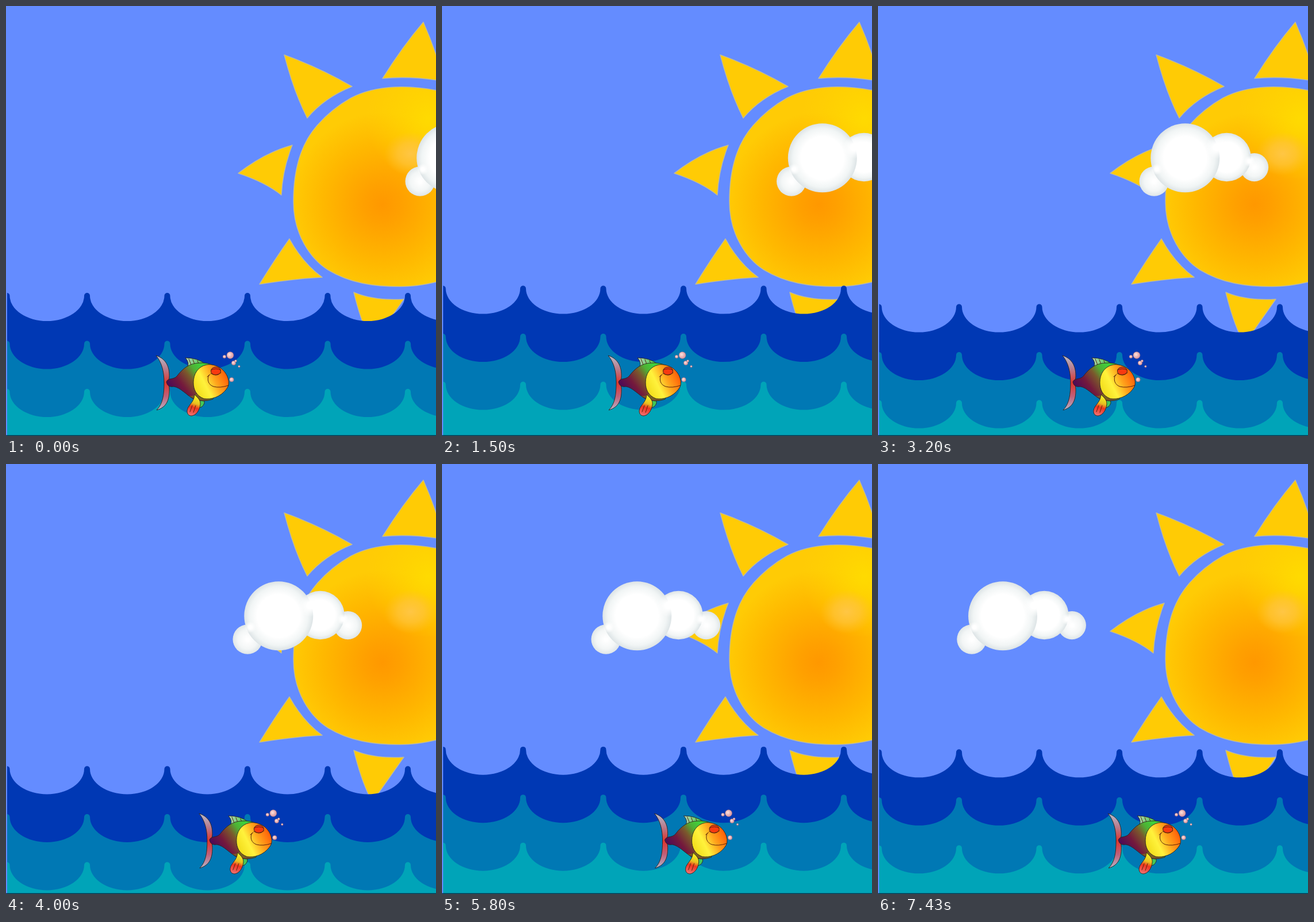
An HTML page for the animation above (7570 ms loop, 748 by 748 pixels).

```html
<!DOCTYPE html>
<html lang="en">
<head>
<meta charset="utf-8">
<title>Sun, sea and fish</title>
<style>
  html, body { margin: 0; width: 100%; height: 100%; overflow: hidden; background: #648cff; }
  svg { display: block; width: 100vw; height: 100vh; }
  .ink { stroke: #2c2420; stroke-width: .9; stroke-linejoin: round; }
  .line { fill: none; stroke: #5a2408; stroke-width: 1; stroke-linecap: round; }
</style>
</head>
<body>
<svg viewBox="0 0 748 748" preserveAspectRatio="none">
  <defs>
    <radialGradient id="sunGlow" gradientUnits="userSpaceOnUse" cx="655" cy="345" r="160">
      <stop offset="0" stop-color="#ff9800"/>
      <stop offset=".2" stop-color="#ffa000"/>
      <stop offset=".65" stop-color="#ffb800"/>
      <stop offset="1" stop-color="#ffcb05"/>
    </radialGradient>
    <radialGradient id="sunTop" gradientUnits="userSpaceOnUse" cx="735" cy="195" r="110">
      <stop offset="0" stop-color="#ffdc00" stop-opacity=".9"/>
      <stop offset="1" stop-color="#ffd400" stop-opacity="0"/>
    </radialGradient>
    <radialGradient id="shine">
      <stop offset="0" stop-color="#ffc648" stop-opacity=".95"/>
      <stop offset=".5" stop-color="#ffc440" stop-opacity=".65"/>
      <stop offset="1" stop-color="#ffc030" stop-opacity="0"/>
    </radialGradient>
    <radialGradient id="puff">
      <stop offset=".62" stop-color="#fff"/>
      <stop offset=".85" stop-color="#f1f5f5"/>
      <stop offset="1" stop-color="#dde4e6"/>
    </radialGradient>
    <radialGradient id="smallPuff">
      <stop offset=".1" stop-color="#fff"/>
      <stop offset=".65" stop-color="#f3f6f6"/>
      <stop offset="1" stop-color="#dfe6e8"/>
    </radialGradient>
    <radialGradient id="soft">
      <stop offset=".3" stop-color="#fff"/>
      <stop offset="1" stop-color="#fff" stop-opacity="0"/>
    </radialGradient>
    <linearGradient id="tail" x1="0" y1="0" x2="0" y2="1">
      <stop offset="0" stop-color="#b9bccb"/>
      <stop offset=".25" stop-color="#b87a8c"/>
      <stop offset=".5" stop-color="#e0352c"/>
      <stop offset=".75" stop-color="#c0607a"/>
      <stop offset="1" stop-color="#b4b4c8"/>
    </linearGradient>
    <linearGradient id="body" gradientUnits="userSpaceOnUse" x1="284" y1="662" x2="338" y2="622">
      <stop offset="0" stop-color="#4c0a58"/>
      <stop offset=".3" stop-color="#74193c"/>
      <stop offset=".58" stop-color="#7a5a2c"/>
      <stop offset=".78" stop-color="#4fb034"/>
      <stop offset="1" stop-color="#3fd23c"/>
    </linearGradient>
    <linearGradient id="head" gradientUnits="userSpaceOnUse" x1="332" y1="668" x2="384" y2="642">
      <stop offset="0" stop-color="#f4e020"/>
      <stop offset=".3" stop-color="#fff23c"/>
      <stop offset=".62" stop-color="#ffa41c"/>
      <stop offset="1" stop-color="#ff5e08"/>
    </linearGradient>
    <linearGradient id="belly" x1=".6" y1="0" x2=".4" y2="1">
      <stop offset=".1" stop-color="#f4ee20"/>
      <stop offset=".4" stop-color="#e8c020"/>
      <stop offset=".6" stop-color="#ee3420"/>
      <stop offset="1" stop-color="#f07070"/>
    </linearGradient>
    <linearGradient id="dorsal">
      <stop offset="0" stop-color="#b4d4b8"/>
      <stop offset="1" stop-color="#3fc840"/>
    </linearGradient>
    <radialGradient id="bubble" cx=".4" cy=".4">
      <stop offset="0" stop-color="#ffe4de"/>
      <stop offset="1" stop-color="#e0a0a8"/>
    </radialGradient>
    <clipPath id="seaBox"><rect x="2" y="0" width="746" height="748"/></clipPath>
  </defs>

  <rect width="748" height="748" fill="#648cff"/>

  <g stroke="#c6bf9a" stroke-opacity=".75" stroke-width="1.6" stroke-linejoin="round">
    <g fill="#ffcb05">
      <path d="M726 28Q690 70 655 126Q705 121 762 131Q748 78 726 28Z"/>
      <path d="M484 85Q545 107 602 140Q553 160 524 195Q501 150 484 85Z"/>
      <path d="M404 291Q450 255 498 242Q481 285 479 329Q452 307 404 291Z"/>
      <path d="M493 405Q516 447 550 472Q505 474 441 484Q466 443 493 405Z"/>
      <path d="M605 498Q640 513 692 510Q664 550 637 588Q618 552 605 498Z"/>
    </g>
    <path id="disc" fill="url(#sunGlow)" d="M760 149C705 137 645 136 600 160C575 174 554 193 541 208C512 241 500 285 500 340C500 398 530 440 560 459C598 482 640 488 685 488C712 488 735 484 760 477Z"/>
  </g>
  <path fill="url(#sunTop)" d="M748 148C705 138 645 138 601 161L601 300H748Z"/>
  <ellipse cx="704" cy="257" rx="46" ry="38" fill="url(#shine)"/>

  <g id="cloud">
    <circle cx="720.3" cy="305" r="25.8" fill="url(#smallPuff)"/>
    <circle cx="894.6" cy="280.6" r="24.6" fill="url(#smallPuff)"/>
    <circle cx="846.5" cy="263" r="42.2" fill="url(#puff)"/>
    <circle cx="774.3" cy="264.3" r="60" fill="url(#puff)"/>
    <circle cx="829" cy="246" r="20" fill="url(#soft)"/>
    <circle cx="886" cy="270" r="10" fill="url(#soft)"/>
    <circle cx="725" cy="284" r="10" fill="url(#soft)"/>
  </g>

  <g clip-path="url(#seaBox)"><g id="sea"></g></g>
  <rect y="746.6" width="748" height="1.4" fill="#0c3048"/>

  <g id="fish">
    <path class="ink" fill="url(#tail)" d="M261 608C277 613 285 626 284 646Q281 655 284 664C285 684 280 698 262 703C273 692 275 676 275 655C275 636 271 620 261 608Z"/>
    <path class="ink" fill="url(#dorsal)" d="M312 612Q332 612 346 622L316 627Q319 620 312 612Z"/>
    <path class="line" d="M318 614l4 10M325 615l3 8M333 617l2 5" stroke-width=".6"/>
    <path class="ink" fill="#43c858" d="M337 685Q346 684 345 691Q342 699 334 699Z"/>
    <path class="ink" fill="url(#body)" d="M279 654C282 646 292 651 298 643C308 630 320 621 336 621Q350 620 360 625V684Q342 690 327 684C314 677 304 664 292 662Q281 664 279 654Z"/>
    <path fill="#7c6c1c" opacity=".75" d="M318 678Q327 680 334 672L346 684Q334 688 318 678Z"/>
    <path class="ink" fill="url(#head)" d="M349 624C366 622 381 632 386 647Q390 659 383 667C373 680 357 685 344 683C331 678 326 667 326 655C326 640 334 627 349 624Z"/>
    <path class="line" d="M353 642C349 650 352 659 361 662Q372 665 387 660M350 645l5 -4"/>
    <ellipse class="ink" cx="365" cy="635" rx="8.6" ry="7" fill="#f83a10"/>
    <path class="line" d="M357 633Q365 629 373 633M356 639Q365 645 374 638"/>
    <path class="ink" fill="url(#belly)" d="M328 676C332 680 339 685 338 693C337 703 331 712 323 713C315 713 313 705 317 698C322 690 327 687 328 676Z"/>
    <path class="line" d="M324 695l-4 11M330 695l-4 12" stroke-width=".6"/>
    <g id="bubbles" fill="url(#bubble)" stroke="#9a6878" stroke-width=".5"></g>
  </g>
</svg>
<script>
const LOOP = 7570, LAST = 7430;
const $ = id => document.getElementById(id);
const SVG = 'http://www.w3.org/2000/svg';

function add(parent, tag, attrs) {
  const el = document.createElementNS(SVG, tag);
  for (const key in attrs) el.setAttribute(key, attrs[key]);
  parent.append(el);
}

// Three identical rows of crests and scoops, each lower than the one before.
['#0038b4', '#0078b4', '#00a4b8'].forEach((fill, row) => {
  const top = 504 + row * 83.5;
  const crests = 'a5 5 0 0 1 10 0a64.75 44 0 0 0 129.5 0'.repeat(6);
  add($('sea'), 'path', { fill, d: `M-3.5 ${top}${crests}V800H-3.5Z` });
});

[[390, 607.5, 6], [380, 610, 2.8], [396, 621, 3.7], [399.5, 617.5, 2], [405.5, 627, 1.8], [392.5, 650, 3.8]]
  .forEach(([cx, cy, r]) => add($('bubbles'), 'circle', { cx, cy, r }));

// The swell moves at constant speed: up, down past the middle, up, back to rest.
const HIGH = 20.3, LOW = 30.5;
function swell(p) {
  const span = HIGH + LOW;
  const d = p * 2 * (HIGH + span);
  if (d < HIGH) return -d;
  if (d < HIGH + span) return d - 2 * HIGH;
  if (d < HIGH + 2 * span) return 2 * span - d;
  return d - 2 * (HIGH + span);
}

// The picture advances every 100 ms, with a longer hold at the end.
const hold = t => t >= LAST ? LAST : Math.min(Math.floor(t / 100), 73) * 100;

const shift = (id, x, y) => $(id).setAttribute('transform', `translate(${x.toFixed(2)} ${y.toFixed(2)})`);

const start = performance.now();
function draw() {
  const t = hold((performance.now() - start) % LOOP);
  shift('cloud', -0.075 * t, 0);
  shift('fish', 0.01872 * t, 0);
  shift('sea', 0, swell(t / LOOP));
  requestAnimationFrame(draw);
}
draw();
</script>
</body>
</html>
```
